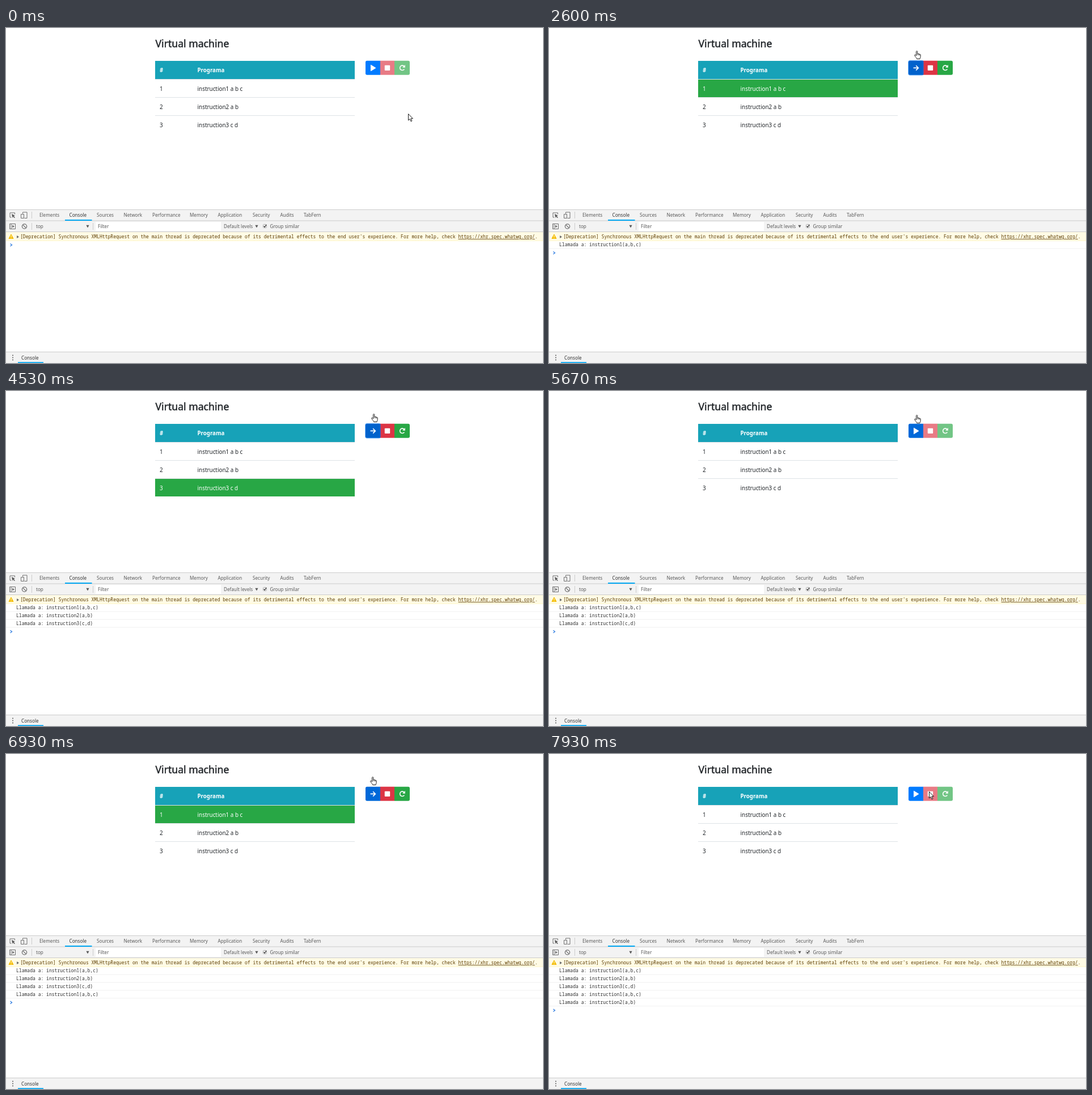
Recreate the animation shown at these times as an HTML page. Size 947 by 591 pixels, loop 8 s.

```html
<!DOCTYPE html>
<html lang="en">
<head>
<meta charset="utf-8">
<title>Virtual machine</title>
<style>
  html, body { margin: 0; width: 100%; height: 100%; overflow: hidden; background: #fff; }
  svg { display: block; width: 947px; height: 591px; }
  text { white-space: pre; font-family: "Noto Sans", "Open Sans", sans-serif; }
  .title { font-size: 17.65px; fill: #212529; stroke: #212529; stroke-width: .45px; }
  .cell { font-size: 9.9px; fill: #212529; }
  .head { font-size: 9.7px; font-weight: 700; fill: #fff; }
  .ui { font-size: 8.15px; fill: #5a5a5a; }
  .dark { fill: #333; }
  .mono { font-family: "Noto Sans Mono", "DejaVu Sans Mono", monospace; font-size: 8.06px; fill: #303030; }
  .warn { fill: #5c3c00; }
  .icon { fill: none; stroke: #6e6e6e; }
</style>
</head>
<body>
<svg id="stage" viewBox="0 0 947 591"></svg>
<script>
const LOOP = 8000, TICK = 200 / 3, LINE = 13.9;
const BLUE = [0, 123, 255], HOVER = [0, 105, 217], ACTIVE = [0, 98, 204];
const RED = [220, 53, 69], RED_HOVER = [200, 35, 51], RED_ACTIVE = [189, 33, 48];

const rect = (x, y, w, h, fill, more = '') =>
  `<rect x="${x}" y="${y}" width="${w}" height="${h}" fill="${fill}" ${more}/>`;
const text = (x, y, cls, str) => `<text x="${x}" y="${y}" class="${cls}">${str}</text>`;
const path = (d, more) => `<path d="${d}" ${more}/>`;
const white = 'fill="#fff"';

const program = ['instruction1 a b c', 'instruction2 a b', 'instruction3 c d'];
const calls = ['1(a,b,c)', '2(a,b)', '3(c,d)', '1(a,b,c)', '2(a,b)'];
const tabs = [['Elements', 59], ['Console', 111.5], ['Sources', 160], ['Network', 207.5],
  ['Performance', 258], ['Memory', 324], ['Application', 373.5], ['Security', 435],
  ['Audits', 483.5], ['TabFern', 525]];

function table() {
  const rows = program.map((code, i) => {
    const y = 91 + 32 * i;
    return rect(263, y - 1, 352, 1, '#dee2e6') +
      `<g id="row${i}">` + rect(263, y, 352, 31, 'none') +
      text(271, y + 19.5, 'cell', i + 1) + text(337.5, y + 19.5, 'cell', code) + '</g>';
  });
  return text(263.5, 34, 'title', 'Virtual machine') +
    rect(263, 58, 352, 32, '#17a2b8') +
    text(271, 78, 'head', '#') + text(337.5, 78, 'head', 'Programa') + rows.join('');
}

function buttons() {
  const left = 'M660 57.700H636.700a2.700 2.700 0 0 0-2.700 2.700V80a2.700 2.700 0 0 0 2.700 2.700H660z';
  const right = 'M685 57.700H709.300a2.700 2.700 0 0 1 2.700 2.700V80a2.700 2.700 0 0 1-2.700 2.700H685z';
  const bold = 'fill="none" stroke="#fff" stroke-width="1.6"';
  return '<g id="redo">' + path(right, 'fill="#28a745"') +
    path('M702.2 67.7A4.2 4.2 0 1 0 702.4 72.6', bold) +
    path('M703.9 65v4.7h-4.7z', white) + '</g>' +
    '<g id="stop">' + rect(660, 57.7, 25, 25, '#dc3545', 'id="stopFace"') +
    rect(667.8, 65.8, 9.4, 9.2, '#fff', 'rx=".9"') + '</g>' +
    rect(634, 57.7, 26, 25, 'none', 'id="ring" rx="3" stroke="#007bff" stroke-opacity=".5"') +
    path(left, 'id="playFace"') +
    path('M643 65.2v10.4q0 .9.8.5l8.1-5q.7-.6 0-1.2l-8.1-5q-.8-.4-.8.3z', 'id="playIcon" ' + white) +
    path('M642.6 70.4H651M647.2 66.2l4.2 4.2-4.2 4.2', 'id="stepIcon" ' + bold);
}

function devtools() {
  const caret = (x, y) => path(`M${x - 2.6} ${y - 2.2}h5.2l-2.6 4.6z`, 'fill="#5a5a5a"');
  const bar = (x, y) => rect(x, y, 1, 12, '#ccc');
  return rect(0, 320, 947, 40, '#f3f3f3') + rect(0, 320, 947, 1, '#ccc') +
    rect(0, 339.5, 947, 1, '#ccc') + rect(0, 359, 947, 1, '#ccc') +
    rect(104, 338, 47.5, 2, '#03a9f4') +
    path('M15.5 328.5v-2.5h-8.5v8h2.5', 'class="icon"') +
    path('M10 328l6 3-2.5.8 2.4 2.5-1 1-2.5-2.5-.9 2.4z', 'fill="#5a5a5a"') +
    path('M29.5 327.5v-2.5h7.5v10.5h-4.5M26.5 328.5h5v7h-5z', 'class="icon"') + bar(45, 324) +
    tabs.map(([name, x]) => text(x, 333.2, name === 'Console' ? 'ui dark' : 'ui', name)).join('') +
    path('M6.5 345.5h10v9h-10zM9 345.5v9', 'class="icon"') +
    path('M11 347.5l4 2.5-4 2.5z', 'fill="#6e6e6e"') +
    path('M36.6 350a4.1 4.1 0 1 1-8.2 0a4.1 4.1 0 1 1 8.2 0M29.6 347.1l5.8 5.8',
      'class="icon" stroke-width="1.3"') +
    bar(45, 344) + text(53, 353.2, 'ui', 'top') + caret(144, 350) +
    bar(153, 344) + rect(158, 342, 221, 16, '#fff') +
    text(162, 353.2, 'ui', 'Filter') + text(384, 353.2, 'ui', 'Default levels') + caret(442, 350) +
    rect(453.5, 346.5, 6, 6, '#fff', 'rx="1" stroke="#aaa"') +
    path('M454.6 349.5l1.6 1.7 2.9-4', 'fill="none" stroke="#333" stroke-width="1.3"') +
    text(465.5, 353.2, 'ui', 'Group similar') +
    rect(0, 360, 947, 15, '#fffbe5') + rect(0, 374.7, 947, 1, '#fff5c2') +
    path('M9 364l4 7.5H5z', 'fill="#f4bd00" stroke="#f4bd00" stroke-linejoin="round"') +
    path('M9 366v3M9 369.8v1.2', 'stroke="#fff"') +
    path('M19 366l4 2.5-4 2.5z', 'fill="#6e6e6e"') +
    text(25, 371.2, 'mono warn', '[Deprecation] Synchronous XMLHttpRequest on the main thread is ' +
      "deprecated because of its detrimental effects to the end user's experience. For more help, check " +
      '<tspan text-decoration="underline">https://xhr.spec.whatwg.org/</tspan>.') +
    calls.map((call, i) => `<g id="call${i}">` +
      text(18, 385.2 + LINE * i, 'mono', 'Llamada a: instruction' + call) +
      rect(0, 388.6 + LINE * i, 947, 1, '#f0f0f0') + '</g>').join('') +
    path('M7.5 380.5l3 2.3-3 2.3', 'id="prompt" fill="none" stroke="#2f7de1" stroke-width="1.3"') +
    rect(0, 571, 947, 20, '#f3f3f3') + rect(0, 571, 947, 1, '#ccc') +
    [577.5, 581.5, 585.5].map(y => `<circle cx="12" cy="${y}" r="1" fill="#5a5a5a"/>`).join('') +
    text(27, 585.2, 'ui dark', 'Console') + rect(21, 589.3, 45, 1.7, '#03a9f4');
}

const ink = 'fill="#fff" stroke="#000" stroke-width=".9" stroke-linejoin="round"';
const cursors = path('M.5.6v11.3l2.6-2.4 2 4.3 1.8-.8-1.9-4.2h3.5z', 'id="arrow" ' + ink) +
  '<g id="hand">' + path('M3.6 8.9V2c0-2 2.2-2 2.2 0v3.6c.5-.8 1.9-.6 2 .4.5-.6 1.7-.4 1.8.5' +
    '.6-.4 1.6 0 1.6.9v3c0 1.7-1.1 2.3-1.2 4.1H4.6c-.2-1.5-1.5-2.5-2.4-3.9L.7 8.5' +
    'C.3 7.3 1.6 6.8 2.3 7.6z', ink) +
  path('M5.8 5.6v2.6M7.8 6v2.3M9.6 6.5v2', 'stroke="#000" stroke-width=".7"') + '</g>';

document.getElementById('stage').innerHTML =
  rect(0, 0, 947, 591, '#fff') + table() + buttons() + devtools() + cursors;
const el = id => document.getElementById(id);
const set = (id, name, value) => el(id).setAttribute(name, value);
const show = (id, on) => set(id, 'visibility', on ? 'visible' : 'hidden');

// Keys are [time, values]; equal times make a hard change.
const pointer = [[0, [709, 151]], [133, [686, 108]], [333, [660, 60]], [400, [660, 60]],
  [600, [647, 65]], [5600, [647, 65]], [5667, [647, 67]], [5800, [647, 75]], [5933, [647, 75]],
  [6267, [647, 65]], [6867, [647, 65]], [6933, [645, 65]], [7133, [645, 65]], [7600, [670, 66]]];
const playColor = [[0, BLUE], [600, BLUE], [800, HOVER], [1333, HOVER], [1400, ACTIVE],
  [1466, ACTIVE], [1466, BLUE], [1667, HOVER], [2533, HOVER], [2600, ACTIVE], [2666, ACTIVE],
  [2666, BLUE], [3533, BLUE], [3733, HOVER], [4467, HOVER], [4533, ACTIVE], [4599, ACTIVE],
  [4599, BLUE], [4800, HOVER], [6400, HOVER], [6467, ACTIVE], [6532, ACTIVE], [6532, BLUE],
  [6733, HOVER], [6933, HOVER], [7000, ACTIVE], [7066, ACTIVE], [7066, BLUE]];
const stopColor = [[0, RED], [7400, RED], [7600, RED_HOVER], [7733, RED_HOVER],
  [7800, RED_ACTIVE], [7866, RED_ACTIVE], [7866, RED]];
const ringWidth = [[0, [0]], [2533, [0]], [2600, [1]], [2666, [1]], [2666, [0]],
  [3600, [0]], [3733, [2]], [3867, [0]], [4467, [0]], [4533, [1]], [4599, [1]], [4599, [0]],
  [6933, [0]], [7000, [1]], [7066, [1]], [7066, [0]]];
const activeRow = [[0, -1], [1466, 0], [2666, 1], [3733, 2], [4599, -1], [6532, 0], [7066, 1], [7866, -1]];
const callTimes = [1466, 2666, 3733, 6532, 7066];

const lastKey = (keys, t) => keys.findLastIndex(key => key[0] <= t);
function sample(keys, t) {
  const i = lastKey(keys, t), [t0, from] = keys[i];
  if (i === keys.length - 1) return from;
  const [t1, to] = keys[i + 1];
  return from.map((v, k) => v + (to[k] - v) * (t - t0) / (t1 - t0));
}
const rgb = c => `rgb(${c.map(Math.round)})`;

function render(time) {
  const t = Math.floor((time + 4) / TICK) * TICK % LOOP;
  const row = activeRow[lastKey(activeRow, t)][1], running = row >= 0;
  program.forEach((_, i) => {
    const [face, ...labels] = el('row' + i).children;
    face.setAttribute('fill', i === row ? '#28a745' : 'none');
    labels.forEach(label => label.style.fill = i === row ? '#fff' : '');
  });
  const count = callTimes.filter(start => start <= t).length;
  calls.forEach((_, i) => show('call' + i, i < count));
  set('prompt', 'transform', `translate(0 ${LINE * count})`);
  show('playIcon', !running);
  show('stepIcon', running);
  set('stop', 'opacity', running ? 1 : .65);
  set('redo', 'opacity', running ? 1 : .65);
  set('playFace', 'fill', rgb(sample(playColor, t)));
  set('stopFace', 'fill', rgb(sample(stopColor, t)));
  set('ring', 'stroke-width', 2 * sample(ringWidth, t)[0]);
  const [x, y] = sample(pointer, t), over = t >= 599 && t < 7930;
  show('arrow', !over);
  show('hand', over);
  set('arrow', 'transform', `translate(${x} ${y})`);
  set('hand', 'transform', `translate(${x - 3} ${y - 25})`);
}

const start = performance.now();
function frame() {
  render((performance.now() - start) % LOOP);
  requestAnimationFrame(frame);
}
render(0);
requestAnimationFrame(frame);
</script>
</body>
</html>
```
